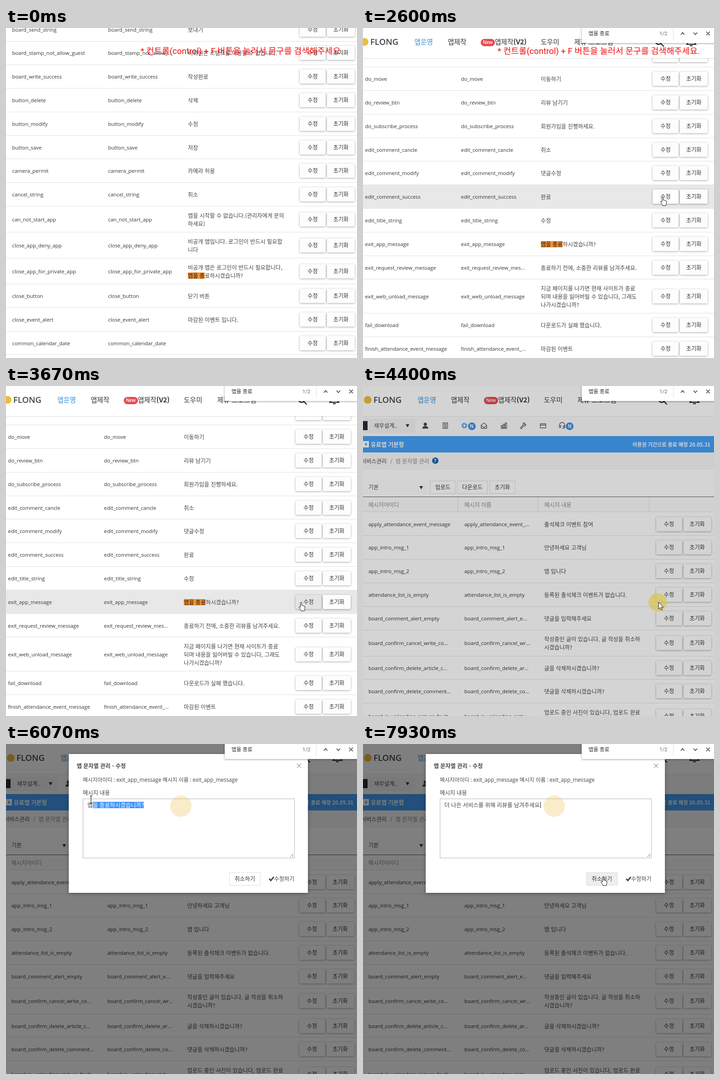
These frames come from a looping animation (772 px wide and 725 px high, 8000 ms). An HTML page:

```html
<!DOCTYPE html>
<html lang="ko">
<head>
<meta charset="utf-8">
<title>앱 문자열 관리</title>
<style>
html, body { margin: 0; width: 100%; height: 100%; overflow: hidden; background: #fff; }
#stage { position: relative; width: 772px; height: 725px; overflow: hidden; color: #444;
  font: 12.2px "Noto Sans CJK KR", "Noto Sans CJK JP", "Noto Sans CJK", sans-serif; }
#stage div, #stage svg { position: absolute; box-sizing: border-box; }
#stage svg { overflow: visible; }
.scene, .page { left: 0; top: 0; width: 772px; height: 725px; }
.scene { background: #fff; overflow: hidden; }
.t { line-height: 18px; white-space: pre; }
.key { font: 11.4px/18px "Open Sans", "Noto Sans", sans-serif; color: #333; }
.mixed { font: 11.7px/18px "Open Sans", "Noto Sans CJK KR", sans-serif; }
.row { left: -20px; width: 820px; border-bottom: 1px solid #e2e2e2; }
.btn { background: #fdfdfd; border-radius: 2px; height: 31px; line-height: 30px; text-align: center;
  color: #333; box-shadow: 0 1px 4px rgba(0,0,0,.34); }
.flat { background: #fff; border: 1px solid #ddd; height: 29px; line-height: 26px; text-align: center; color: #333; }
mark, .found1, .found2, .pick1, .pick2 { display: inline-block; line-height: 14px; }
mark, .found1 { background: #f39335; color: #111; font-weight: 500; }
.nav { font-size: 14.8px; font-weight: 500; color: #333; }
.brand { font: 600 18.5px/18px "Open Sans", "Noto Sans", sans-serif; color: #444; }
.blue { color: #2f8fe0; }
.bold { font-weight: 700; }
.grey { color: #888; }
.white { color: #fff; }
.badge { background: #3b95e6; color: #fff; width: 17px; height: 17px; border-radius: 50%;
  font: 700 10px/17px "Open Sans", sans-serif; text-align: center; }
.new { background: #e54b50; border-radius: 8px; color: #fff; font: 600 10px/15px "Open Sans", sans-serif; text-align: center; }
.plan { background: #fff; color: #45a0f8; font: 700 9px/14px "Open Sans", sans-serif; text-align: center; }
.help { background: #1f66b0; color: #fff; border-radius: 50%; font: 700 11px/14px "Open Sans", sans-serif; text-align: center; }
.rule { background: #ddd; }

#a { animation: sceneA 8s step-end infinite; }
#b { animation: sceneB 8s step-end infinite; }
#c { animation: sceneC 8s step-end infinite; }
@keyframes sceneA { 0% { visibility: visible } 20%, 100% { visibility: hidden } }
@keyframes sceneB { 0% { visibility: hidden } 20% { visibility: visible } 53.375%, 100% { visibility: hidden } }
@keyframes sceneC { 0% { visibility: hidden } 53.375%, 100% { visibility: visible } }

.found1 { animation: found1 8s step-end infinite; }
.found2 { animation: found2 8s step-end infinite; }
@keyframes found1 { 0% { background: #f39335 } 5% { background: #f3933500 } 5.875%, 100% { background: #f39335 } }
@keyframes found2 { 0% { background: #f3933500 } 5.875%, 100% { background: #f39335 } }

#hint { left: 296px; top: 37px; font: 18.6px/28px Roboto, "Noto Sans CJK KR", sans-serif; white-space: pre;
  color: #f01010; animation: hint 8s linear infinite; }
@keyframes hint { 0%, 38% { opacity: 1 } 45.875%, 99.99% { opacity: 0 } 100% { opacity: 1 } }

#find { left: 481px; top: -10px; width: 310px; height: 43px; background: #fff;
  box-shadow: 0 1px 4px rgba(0,0,0,.4); animation: find 8s step-end infinite; }
@keyframes find { 0% { visibility: hidden } 20%, 100% { visibility: visible } }

#hover { left: 0; top: 86px; width: 772px; height: 51px; background: #e8e8e8; animation: hover 8s step-end infinite; }
@keyframes hover {
  0% { transform: translateY(155.4px); opacity: 0 }
  29.125% { transform: translateY(155.4px); opacity: 1 }
  30.875% { transform: translateY(207.2px); opacity: 1 }
  31.625% { transform: translateY(259px); opacity: 1 }
  33.375% { transform: translateY(310.8px); opacity: 1 }
  34.125%, 100% { transform: translateY(362.6px); opacity: 1 }
}
.pressed { animation: pressed 8s step-end infinite; }
@keyframes pressed { 0% { background: #fdfdfd } 35%, 100% { background: #e3e3e3 } }

#dim { left: 0; top: 0; width: 772px; height: 725px; background: #000; animation: dim 8s step-end infinite; }
@keyframes dim { 0% { opacity: 0 } 54.125% { opacity: .08 } 55% { opacity: .17 } 55.875% { opacity: .34 } 56.625%, 100% { opacity: .5 } }

#modal { left: 138px; top: 22px; width: 526px; height: 305px; background: #fff;
  box-shadow: 0 2px 8px rgba(0,0,0,.3); animation: modal 8s step-end infinite; }
@keyframes modal {
  0% { opacity: 0; transform: translateY(-60px) }
  55.875% { opacity: .3; transform: translateY(-40px) }
  56.625% { opacity: .75; transform: translateY(-12px) }
  57.5%, 100% { opacity: 1; transform: none }
}
#area { left: 31px; top: 98px; width: 466px; height: 131px; border: 1px solid #b5b5b5; }
#old, #new { left: 9px; top: 4px; }
#old { font-size: 12.5px; animation: old 8s linear infinite; }
#new { font-size: 12.3px; animation: new 8s linear infinite; }
@keyframes old { 0%, 83.3% { opacity: 1 } 87.5%, 100% { opacity: 0 } }
@keyframes new { 0%, 83.3% { opacity: 0 } 87.5%, 100% { opacity: 1 } }
.pick1 { animation: pick 8s step-end infinite; }
.pick2 { animation: pick2 8s step-end infinite; }
@keyframes pick { 0% { background: #3d94f600; color: #444 } 79.125%, 100% { background: #3d94f6; color: #fff } }
@keyframes pick2 { 0% { background: #3d94f600; color: #444 } 74.125%, 100% { background: #3d94f6; color: #fff } }
#caret { left: 220px; top: 6px; width: 1px; height: 14px; background: #222; animation: caret 8s step-end infinite; }
@keyframes caret { 0% { opacity: 0 } 93.375%, 100% { opacity: 1 } }
#cancel { left: 353px; top: 260px; width: 69px; animation: cancel 8s step-end infinite; }
@keyframes cancel { 0% { background: #fff } 97.5%, 100% { background: #eee } }

.spot { border-radius: 50%; background: #f0c45a52; width: 47px; height: 47px; }
#spot1 { left: 628px; top: 455px; width: 40px; height: 40px; background: #d9c23fa0; animation: spot1 8s step-end infinite; }
#spot2 { left: 361px; top: 113px; animation: spot2 8s step-end infinite; }
#spot3 { left: 397px; top: 113px; animation: spot3 8s step-end infinite; }
@keyframes spot1 {
  0% { opacity: 0 } 50% { opacity: .5; transform: translate(2px, 2px) scale(.88) }
  50.875% { opacity: .8; transform: translate(2px, 2px) scale(.9) }
  51.625% { opacity: 1; transform: translate(1px, 1px) scale(.92) }
  53.375% { opacity: 1; transform: none } 56.625% { opacity: .4 } 57.5%, 100% { opacity: 0 }
}
@keyframes spot2 { 0% { opacity: 0 } 73.375% { opacity: 1 } 76.625%, 100% { opacity: 0 } }
@keyframes spot3 { 0% { opacity: 0 } 93.375%, 100% { opacity: 1 } }

#cursor { left: 0; top: 0; width: 1px; height: 1px; animation: move 8s step-end infinite, show 8s linear infinite; }
#hand { animation: hand 8s step-end infinite; }
#arrow { animation: arrow 8s step-end infinite; }
#beam { animation: beam 8s step-end infinite; }
@keyframes move {
  0%, 29.125% { transform: translate(680px, 298px) }
  30.875% { transform: translate(672px, 328px) }
  31.625% { transform: translate(664px, 352px) }
  32.5% { transform: translate(659px, 371px) }
  33.375% { transform: translate(655px, 408px) }
  34.125% { transform: translate(651px, 452px) }
  35% { transform: translate(649px, 475px) }
  53.375% { transform: translate(650px, 475px) }
  62.5% { transform: translate(590px, 385px) }
  63.375% { transform: translate(495px, 225px) }
  64.125% { transform: translate(438px, 158px) }
  65.875% { transform: translate(415px, 140px) }
  66.625% { transform: translate(399px, 128px) }
  68.375% { transform: translate(370px, 131px) }
  69.125% { transform: translate(330px, 139px) }
  70% { transform: translate(305px, 143px) }
  70.875% { transform: translate(345px, 140px) }
  71.625% { transform: translate(385px, 136px) }
  74.125% { transform: translate(187px, 122px) }
  78.375% { transform: translate(181px, 122px) }
  79.125% { transform: translate(174px, 122px) }
  80% { transform: translate(168px, 122px) }
  90% { transform: translate(361px, 121px) }
  91.625% { transform: translate(390px, 129px) }
  92.5% { transform: translate(421px, 137px) }
  94.125% { transform: translate(430px, 152px) }
  95% { transform: translate(452px, 185px) }
  95.875% { transform: translate(486px, 232px) }
  96.625% { transform: translate(513px, 270px) }
  97.5% { transform: translate(524px, 286px) }
  98.375%, 100% { transform: translate(528px, 292px) }
}
@keyframes show {
  0%, 29.12% { opacity: 0 } 29.125%, 83.3% { opacity: 1 }
  87.5%, 90.87% { opacity: 0 } 90.875%, 100% { opacity: 1 }
}
@keyframes hand { 0% { visibility: hidden } 32.5% { visibility: visible } 53.375% { visibility: hidden } 97.5%, 100% { visibility: visible } }
@keyframes arrow { 0% { visibility: visible } 32.5% { visibility: hidden } 53.375% { visibility: visible }
  64.125% { visibility: hidden } 95.875% { visibility: visible } 97.5%, 100% { visibility: hidden } }
@keyframes beam { 0% { visibility: hidden } 64.125% { visibility: visible } 95.875%, 100% { visibility: hidden } }
</style>
</head>
<body>
<div id="stage"></div>
<script>
const box = (x, y, w, h, cls = '', inner = '', style = '') =>
  `<div class="${cls}" style="left:${x}px;top:${y}px;width:${w}px;height:${h}px;${style}">${inner}</div>`;
const text = (x, y, s, cls = '', style = '') =>
  `<div class="t ${cls}" style="left:${x}px;top:${y - 9}px;${style}">${s}</div>`;
const svg = (x, y, body, stroke = '#555', width = 1.3) =>
  `<svg style="left:${x}px;top:${y}px" width="1" height="1" fill="none" stroke="${stroke}" stroke-width="${width}">${body}</svg>`;
const path = (d, attrs = '') => `<path d="${d}" ${attrs}/>`;

const rowHeight = [51.8, 57, 74.5];

// Each row: key, message, shortened name, shortened key
function table(dx, y, rows) {
  let out = '';
  for (const [key, msg, name = key, id = key] of rows) {
    const lines = msg.split('\n');
    const h = rowHeight[lines.length - 1], mid = y + h / 2;
    const hot = key === 'exit_app_message' ? 'pressed' : '';
    out += box(-20, y, 820, h, 'row')
      + text(13.5 + dx, mid, id, 'key') + text(224.5 + dx, mid, name, 'key')
      + text(400 + dx, mid - (lines.length - 1) * 9, msg)
      + box(646 + dx, mid - 16, 57, 31, 'btn ' + hot, '수정')
      + box(706 + dx, mid - 16, 61, 31, 'btn', '초기화');
    y += h;
  }
  return out;
}

function header(dx) {
  const at = (x, s, cls = '') => text(x + dx, 30.2, s, 'nav ' + cls);
  return box(-5, 0, 790, 66, '', '', 'background:#fff;box-shadow:0 1px 2px rgba(0,0,0,.14)')
    + box(-5 + dx, 22, 17, 17, '', '', 'background:#edbd3a;border-radius:50%')
    + text(16 + dx, 30, 'FLONG', 'brand')
    + at(113, '앱운영', 'blue') + at(186.5, '앱제작')
    + box(259 + dx, 24, 31, 16, 'new', 'New')
    + at(290, '앱제작<b>(V2)</b>') + at(391, '도우미') + at(464.5, '제휴 프로그램')
    + svg(650 + dx, 29, '<circle r="7"/>' + path('M5 5 11.5 11.5'), '#222', 2.4)
    + svg(722 + dx, 30, path('M-10 6H10L7 2V-4A7 7 0 0 0-7-4V2ZM-3 9H3'), '#222', 2);
}

const listA = [
  ['board_send_string', '보내기'],
  ['board_stamp_not_allow_guest', '비회원은 스탬프를 이용할 수 없습니다.', 'board_stamp_not_allow_...'],
  ['board_write_success', '작성완료'],
  ['button_delete', '삭제'],
  ['button_modify', '수정'],
  ['button_save', '저장'],
  ['camera_permit', '카메라 허용'],
  ['cancel_string', '취소'],
  ['can_not_start_app', '앱을 시작할 수 없습니다.(관리자에게 문의\n하세요)'],
  ['close_app_deny_app', '비공개 앱입니다. 로그인이 반드시 필요합\n니다'],
  ['close_app_for_private_app', '비공개 앱은 로그인이 반드시 필요합니다,\n<span class="found1">앱을 종</span><span class="found2">료</span>하시겠습니까?'],
  ['close_button', '닫기 버튼'],
  ['close_event_alert', '마감된 이벤트 입니다.'],
  ['common_calendar_date', '']
];
const listB = [
  ['', ''],
  ['do_move', '이동하기'],
  ['do_review_btn', '리뷰 남기기'],
  ['do_subscribe_process', '회원가입을 진행하세요.'],
  ['edit_comment_cancle', '취소'],
  ['edit_comment_modify', '댓글수정'],
  ['edit_comment_success', '완료'],
  ['edit_title_string', '수정'],
  ['exit_app_message', '<mark>앱을 종료</mark>하시겠습니까?'],
  ['exit_request_review_message', '종료하기 전에, 소중한 리뷰를 남겨주세요.', 'exit_request_review_mes...'],
  ['exit_web_unload_message', '지금 페이지를 나가면 현재 사이트가 종료\n되며 내용을 잃어버릴 수 있습니다, 그래도\n나가시겠습니까?'],
  ['fail_download', '다운로드가 실패 했습니다.'],
  ['finish_attendance_event_message', '마감된 이벤트', 'finish_attendance_event_...']
];
const listC = [
  ['apply_attendance_event_message', '출석체크 이벤트 참여', 'apply_attendance_event_...'],
  ['app_intro_msg_1', '안녕하세요 고객님'],
  ['app_intro_msg_2', '앱 입니다'],
  ['attendance_list_is_empty', '등록된 출석체크 이벤트가 없습니다.'],
  ['board_comment_alert_empty', '댓글을 입력해주세요', 'board_comment_alert_e...'],
  ['board_confirm_cancel_write', '작성중인 글이 있습니다. 글 작성을 취소하\n시겠습니까?', 'board_confirm_cancel_wr...', 'board_confirm_cancel_write_co...'],
  ['board_confirm_delete_article', '글을 삭제하시겠습니까?', 'board_confirm_delete_ar...', 'board_confirm_delete_article_c...'],
  ['board_confirm_delete_comment', '댓글을 삭제하시겠습니까?', 'board_confirm_delete_co...', 'board_confirm_delete_comment...'],
  ['board_is_uploading_picture_fault', '업로드 중인 사진이 있습니다, 업로드 완료\n후 작성해주세요', 'board_is_uploading_pictu...']
];

const down = (x, y) => svg(x, y, path('M-4-3H4L0 4Z', 'fill="#333" stroke="none"'));

const toolbar = box(-5, 67, 790, 43, '', '', 'background:#fafafa')
  + box(-5, 72, 120, 31, '', '', 'background:#f3f3f3')
  + box(-4, 77, 14, 20, '', '', 'background:#2b2b38')
  + text(24, 87, '재무설계..') + down(98, 87)
  + svg(137, 87, '<g fill="#444" stroke="none"><circle cy="-3" r="3.6"/>' + path('M-6.5 6.5Q-6.5 1 0 1T6.5 6.5Z') + '</g>')
  + svg(181, 87, path('M-5-6H5V6H-5ZM-3-3H3M-3 0H3M-3 3H3'))
  + svg(223, 87, '<circle r="5" stroke-dasharray="2.4 1.5" stroke-width="2.6"/><circle r="3.4"/>', '#3b95e6')
  + box(230.5, 80, 17, 17, 'badge', 'N')
  + svg(266, 87, path('M-6-1 0-6 6-1V6H-6ZM-6 0 0 4 6 0'))
  + svg(310, 87, path('M-6 6V0H-3V6ZM-1.5 6V-3H1.5V6ZM3 6V-6H6V6Z'))
  + svg(352, 87, path('M-6 5 0-1Q-1-6 4-6L2-3 4-1 6-3Q6 2 1 1L-4 7Z'))
  + svg(396, 87, path('M-6-4H6V5H-6ZM-6-1H6'))
  + svg(438, 87, path('M-6 3V-1A6 6 0 0 1 6-1V3Q6 6 1 6M-6 0H-3V4H-6ZM3 0H6V4H3Z'))
  + box(446, 80, 17, 17, 'badge', 'N');

const planBar = box(0, 110, 772, 36, '', '', 'background:#45a0f8')
  + box(0, 121, 13, 14, 'plan', 'B')
  + text(17, 128, '유료앱 기본형', 'white bold', 'font-size:12.6px')
  + text(0, 128, '이용권 기간으로 종료 예정 20.05.31', 'white bold', 'left:auto;right:8px;font-size:11.1px');

const crumbs = box(-5, 146, 790, 37, '', '', 'background:#f8f8f8;border-bottom:1px solid #eee')
  + text(-4, 164.5, '서비스관리') + text(60, 164.5, '/', 'grey') + text(71.5, 164.5, '앱 문자열 관리', 'grey')
  + box(151.5, 157, 14, 14, 'help', '?');

const filters = box(-5, 208, 146, 29, '', '', 'background:#fdfdfd') + text(12, 222, '기본') + down(128, 223)
  + box(147, 208, 57, 29, 'flat', '업로드') + box(207, 208, 67, 29, 'flat', '다운로드') + box(278, 208, 57, 29, 'flat', '초기화')
  + box(0, 243, 772, 34, '', '', 'background:#fbfbfb;border-top:1px solid #555;border-bottom:1px solid #e2e2e2')
  + [208, 384, 629].map(x => box(x, 244, 1, 32, 'rule')).join('')
  + text(12, 260.5, '메시지아이디', 'grey') + text(223, 260.5, '메시지 이름', 'grey') + text(399, 260.5, '메시지 내용', 'grey');

const modal = text(17.5, 26, '앱 문자열 관리 - 수정', 'bold')
  + text(499, 25, '×', 'grey', 'font-size:15px')
  + text(31, 56, '메시지아이디 : exit_app_message 메시지 이름 : exit_app_message', 'mixed')
  + text(31, 85, '메시지 내용')
  + `<div id="area">
    <div class="t" id="old"><span class="pick1">앱</span><span class="pick2">을 종료하시겠습니까?</span></div>
    <div class="t" id="new">더 나은 서비스를 위해 리뷰를 남겨주세요!</div>
    <div id="caret"></div></div>`
  + svg(494, 226, path('M0-7-7 0M0-3-3 0'), '#666', 1)
  + '<div id="cancel" class="flat">취소하기</div>'
  + svg(446, 274, path('M-5 0-1.5 4 5-4'), '#444', 2.8)
  + text(451.5, 274, '수정하기');

const find = text(15, 21, '앱을 종료', '', 'color:#222;font-size:11.6px')
  + text(171, 22, '1/2', '', 'color:#666;font:11.4px/18px Roboto,sans-serif')
  + box(201, 0, 1, 36, 'rule')
  + svg(222, 22, path('M-4 2.5 0-2 4 2.5M24-2 28 2.5 32-2M52-4 60 4M60-4 52 4'), '#444', 1.6);

const pointers = `
  <svg id="hand" width="1" height="1" fill="#fff" stroke="#111" stroke-linejoin="round"><path transform="translate(-5.4 -.8)"
    d="M4 12V2.2a1.4 1.4 0 0 1 2.8 0V8l1-.3c.8 0 1.3.4 1.5 1l1-.2c.8 0 1.2.4 1.4 1l.7-.1c.9 0 1.4.6 1.4 1.4V14c0 2-1 3-1.2 6H5.5C5 17 2.5 14.8 1 12.4c-.6-1 .6-2.2 1.6-1.4z"/></svg>
  <svg id="arrow" width="1" height="1" fill="#fff" stroke="#111"><path d="M0 0V15l3.5-3.2 2.4 5.4 2.4-1-2.4-5.2h4.7z"/></svg>
  <svg id="beam" width="1" height="1" fill="none" stroke="#222" stroke-width="1.2"><path d="M-3-8H3M0-8V8M-3 8H3"/></svg>`;

document.getElementById('stage').innerHTML = `
  <div id="a" class="scene">${table(0, -22.3, listA)}</div>
  <div id="b" class="scene"><div id="hover"></div>${table(-9, 34.4, listB)}${header(0)}</div>
  <div id="c" class="scene">
    <div class="page">${table(-1.5, 277.6, listC)}${header(7)}${toolbar}${planBar}${crumbs}${filters}</div>
    <div id="dim"></div><div id="modal">${modal}</div>
  </div>
  <div id="hint">* 컨트롤(control) + F 버튼을 눌러서 문구를 검색해주세요.</div>
  <div id="find">${find}</div>
  <div class="spot" id="spot1"></div><div class="spot" id="spot2"></div><div class="spot" id="spot3"></div>
  <div id="cursor">${pointers}</div>`;
</script>
</body>
</html>
```
